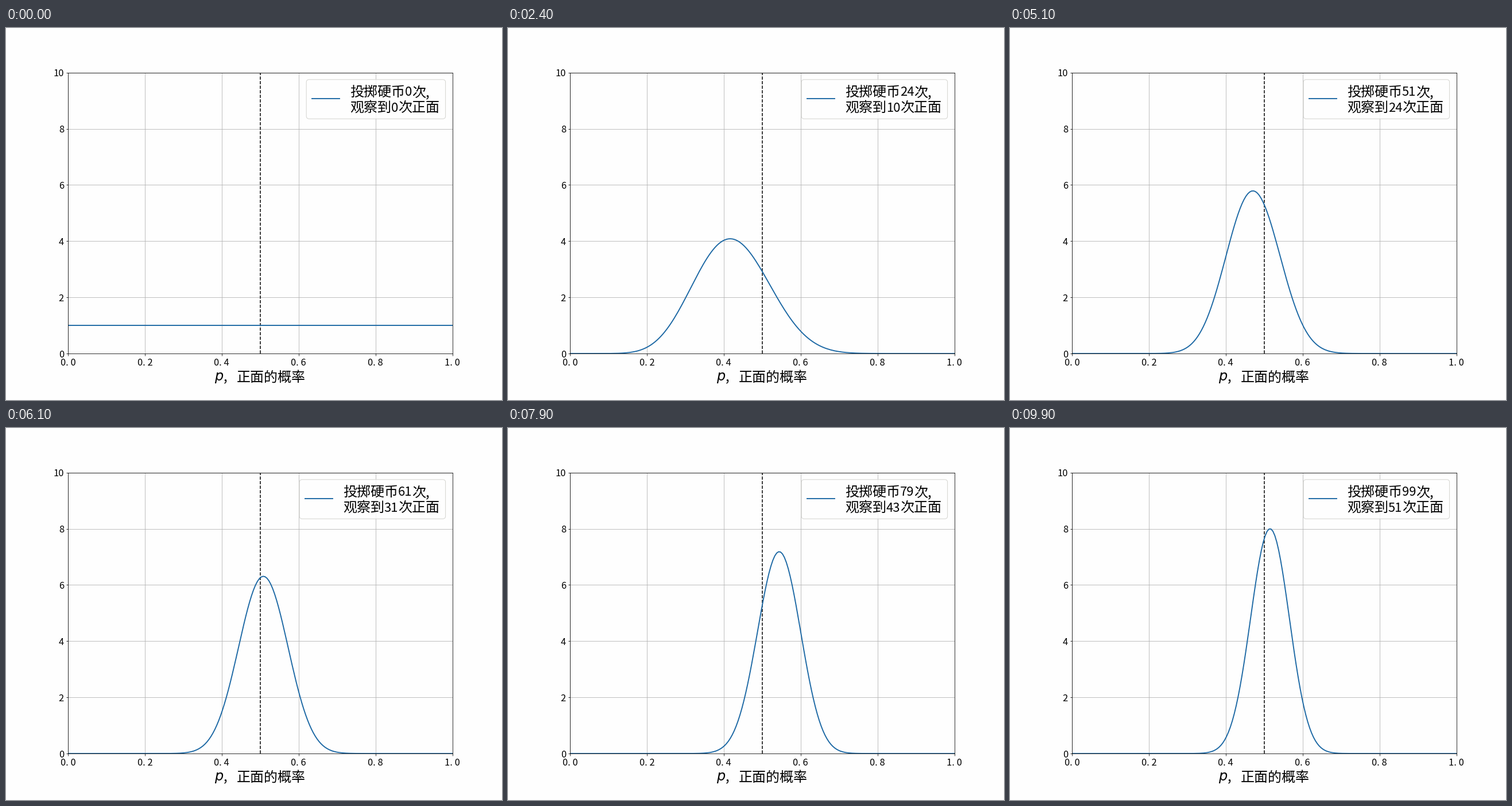
A matplotlib script that plays this animation: 864x648 px, repeating every 10 s.

```python
from math import comb

import matplotlib.pyplot as plt
import numpy as np
from matplotlib.animation import FuncAnimation
from matplotlib.lines import Line2D
from matplotlib.patches import FancyBboxPatch
from matplotlib.transforms import IdentityTransform

W, H, DPI = 864, 648, 72
FRAMES, INTERVAL = 100, 100
EM = 24                      # label and legend size in pixels
RIGHT, TOP, BOTTOM = 765.6, 89.8, 158.2
PAPER, BLUE = "#fefefe", "#1c68a4"

# Running head count, pinned at a few toss numbers
TOSSES = [0, 24, 37, 51, 70, 87, 99]
HEADS = [0, 10, 19, 24, 38, 47, 51]

plt.rcParams["font.family"] = "Noto Sans CJK JP"
PIXELS = IdentityTransform()

fig, ax = plt.subplots(figsize=(W / DPI, H / DPI), dpi=DPI, facecolor=PAPER)
fig.subplots_adjust(left=0.125, right=0.9, bottom=0.125, top=0.88)
ax.set_facecolor(PAPER)
ax.set(xlim=(0, 1), ylim=(0, 10))
ax.grid(True, color="#b0b0b0", lw=0.8)
ax.tick_params(labelsize=16.5)
ax.tick_params(axis="x", pad=4.2)
ax.xaxis.set_major_formatter(lambda v, _: f"{v:.1f}".replace(".", ". "))
ax.axvline(0.5, color="black", ls="--", lw=1.5)

p = np.linspace(0, 1, 200)
curve, = ax.plot(p, np.ones_like(p), color=BLUE, lw=1.9)


def label(x, y, s="", **kw):
    """Text on a baseline, in pixels from the top left corner."""
    style = dict(size=EM, ha="left", va="baseline", transform=PIXELS)
    return fig.text(x, H - y, s, **(style | kw))


label(363, 614, "p", family="DejaVu Sans", style="italic")
label(379, 614.5, ",")
label(402, 616, "正面的概率")

box = FancyBboxPatch((0, H - BOTTOM), 1, BOTTOM - TOP, transform=PIXELS,
                     boxstyle=f"round,pad=0,rounding_size={0.2 * EM}",
                     facecolor=(1, 1, 1, 0.8), edgecolor="#d4d4d0", lw=1)
key = Line2D([], [], color=BLUE, lw=1.9, transform=PIXELS)
fig.add_artist(box)
fig.add_artist(key)


class CountLine:
    """Words, a number, then more words."""

    def __init__(self, y, head, tail):
        self.lead = len(head) * EM
        self.head = label(0, y, head)
        self.num = label(0, y - 0.5, size=22, ha="center")
        self.tail = label(0, y, tail)

    def show(self, x, value):
        width = len(str(value)) * EM / 2
        self.head.set_x(x)
        self.num.set_x(x + self.lead + width / 2)
        self.num.set_text(str(value))
        self.tail.set_x(x + self.lead + width)


toss_line = CountLine(119, "投掷硬币", "次,")
head_line = CountLine(146, "观察到", "次正面")


def update(n):
    heads = int(np.interp(n, TOSSES, HEADS) + 0.5)
    curve.set_ydata((n + 1) * comb(n, heads) * p**heads * (1 - p)**(n - heads))

    digits = max(len(str(n)), len(str(heads)))
    text_x = RIGHT - (6.4 + digits / 2) * EM
    left = text_x - 3.2 * EM
    box.set_x(left)
    box.set_width(RIGHT - left)
    key.set_data([left + 0.4 * EM, left + 2.4 * EM], [H - 123, H - 123])
    toss_line.show(text_x - 1, n)
    head_line.show(text_x - 1, heads)
    return curve, box, key


anim = FuncAnimation(fig, update, frames=FRAMES, interval=INTERVAL,
                     repeat=True, repeat_delay=0, blit=False)
plt.show()
```
